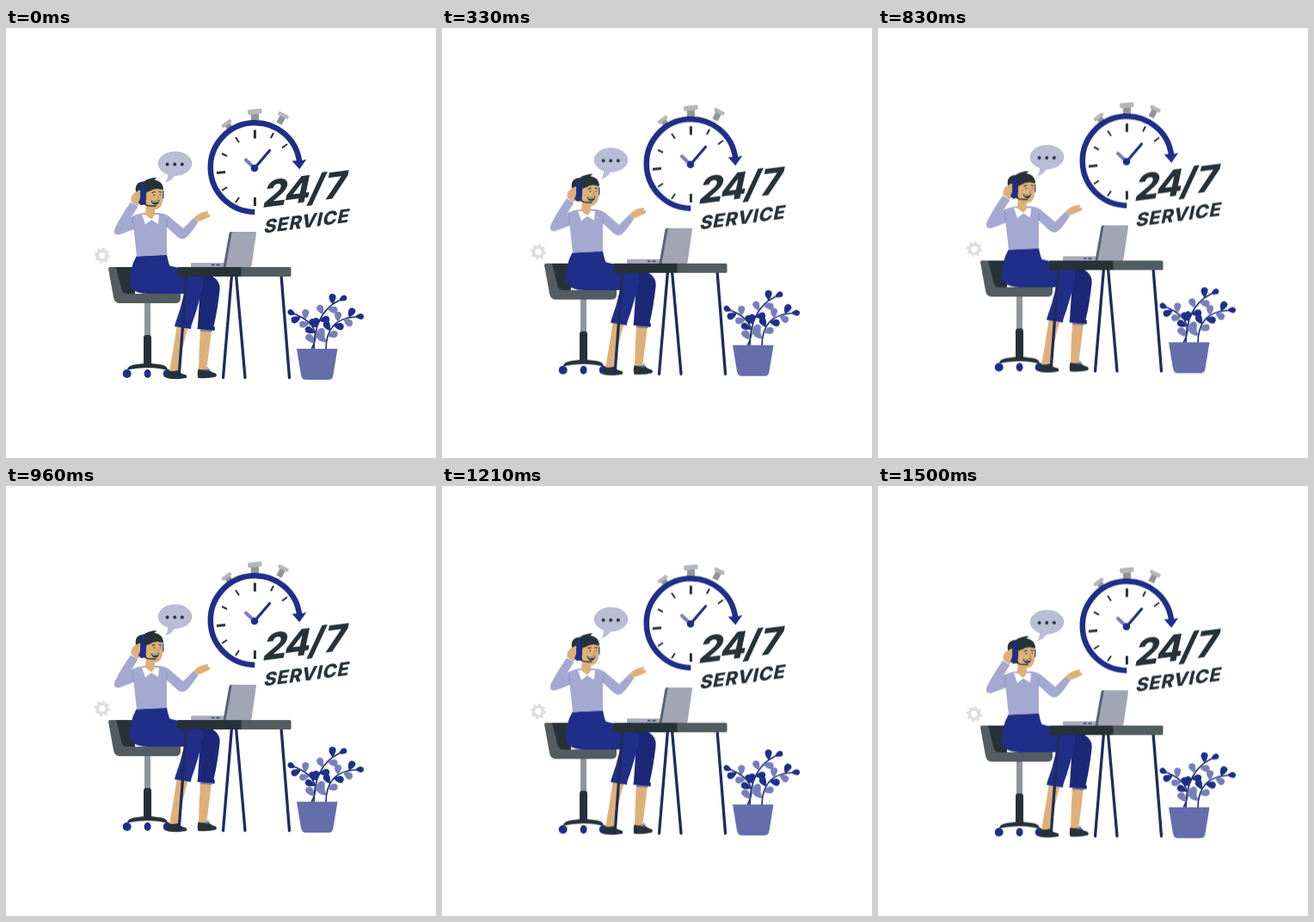
Recreate the animation shown at these times as an HTML page. Size 500 by 500 pixels, loop 1.54 s.

```html
<!DOCTYPE html>
<html lang="en">
<head>
<meta charset="utf-8">
<title>24/7 service</title>
<style>
  html, body { margin: 0; width: 100%; height: 100%; overflow: hidden; background: #fff; }
  svg { display: block; width: 100vw; height: 100vh; }
  #scene { animation: bob 1540ms -62ms infinite linear; }
  @keyframes bob {
    0%, 100% { transform: translateY(.8px); }
    50% { transform: translateY(-9.2px); }
  }
  .navy { fill: #1f2e88; }
  .deep { fill: #1b2877; }
  .lav { fill: #a3a9d1; }
  .mid { fill: #7680b8; }
  .skin { fill: #deb079; }
  .dark { fill: #263238; }
  .slate { fill: #525c61; }
  .gray { fill: #8f9699; }
  .pale { fill: #b4b7bb; }
  .white { fill: #fff; }
  .line { fill: none; stroke-linecap: round; stroke-linejoin: round; }
  .flat { fill: none; }
  text { font-family: Inter, "Open Sans", sans-serif; fill: #263238; }
</style>
</head>
<body>
<svg viewBox="0 0 500 500">
  <defs>
    <path id="leaf" d="M0 0C-3-3-5-7-4.500-10Q-3.500-13.500 0-13.500Q4.500-13 4.500-9Q4-5 0 0Z"/>
    <g id="button">
      <rect class="gray" x="-3.500" y="0" width="7" height="11"/>
      <rect class="pale" x="-6.500" y="-2.200" width="13" height="4.400" rx="1.500"/>
    </g>
  </defs>
  <g id="scene">
    <!-- stopwatch -->
    <use href="#button" transform="translate(256.500 111) rotate(-36)"/>
    <use href="#button" transform="translate(322.500 101.500) rotate(27)"/>
    <rect class="gray" x="285" y="98" width="9" height="10"/>
    <rect class="pale" x="-8.300" y="-3" width="16.600" height="6" rx="2" transform="translate(289.300 97.300) rotate(-6)"/>
    <path class="flat" d="M289.300 214A51.900 51.900 0 1 1 341.200 156" stroke="#1f2e88" stroke-width="6.500"/>
    <path class="navy" d="M332.600 154.400L344 154L349.300 152.800L341.200 164.300Z"/>
    <path class="flat" d="M289.400 118.500V128.500M289.400 197V207M245 168.500L255 167.500" stroke="#263238" stroke-width="3"/>
    <path class="flat" d="M251 146L257 149M267 127L271 133M311 122L308 128M327 135L321 139.500M251 189L257 185M267 203L271 197" stroke="#263238" stroke-width="2"/>
    <path class="line" d="M289 163L279 153.500" stroke="#7680b8" stroke-width="4"/>
    <path class="line" d="M289 163L306.500 142.500" stroke="#1f2e88" stroke-width="3.200"/>
    <circle class="navy" cx="289" cy="163" r="4.300"/>

    <!-- lettering -->
    <g transform="matrix(1 -.13 -.21 1 298 209)">
      <text x="-1 24 52 70" font-size="43.500" font-weight="800">24/7</text>
    </g>
    <g transform="matrix(1 -.13 -.21 1 299 238.700)">
      <text font-size="22" font-weight="800" letter-spacing=".6">SERVICE</text>
    </g>

    <!-- speech bubble -->
    <g fill="#b9bdd6" stroke="#abaec0" stroke-width=".8">
      <ellipse cx="196.500" cy="157.700" rx="19.300" ry="13.700"/>
    </g>
    <path fill="#b9bdd6" d="M188 169Q188.500 176 184.800 180Q192 178.500 197 170.500Z"/>
    <path class="line" d="M187.600 158.600h0m8.600 0h0m8.600 0h0" stroke="#263238" stroke-width="4"/>

    <!-- gear -->
    <g fill="none" stroke="#dedede" transform="translate(111.900 264.600)">
      <circle r="5.500" stroke-width="3.600"/>
      <circle r="8" stroke-width="2.200" pathLength="16" stroke-dasharray="1"/>
    </g>

    <!-- chair -->
    <path class="slate" d="M119 280Q119 278 121 278H148V309H203V314Q203 320 197 320H132Q126 320 125 313Z"/>
    <path class="dark" d="M128 278H150V309H141Q135.500 309 134.500 304Z"/>
    <path class="gray" d="M161 320H168V360H161Z"/>
    <path class="dark" d="M160 392V360Q160 357 163 357H166Q169 357 169 360V390L181 391.500Q188 393 188 398Q177 395 164.500 395Q152 395 141 397.500Q141 393 149 391.500L160 390Z"/>
    <g class="navy">
      <circle cx="140.700" cy="402" r="5"/><ellipse cx="164.600" cy="402" rx="4" ry="5"/><circle cx="187.700" cy="402" r="5"/>
    </g>

    <!-- legs -->
    <path class="skin" d="M226 349H239Q236.500 374 233 398H224Q224.500 373 226 349Z"/>
    <path class="skin" d="M199 345L212 347Q204 374 200 400H190Q194.500 374 199 345Z"/>
    <path class="dark" d="M223.500 396.500Q229.500 398.500 235 396.500Q238.500 400.500 243.500 401.500Q246 403.500 244 405.500Q236 408 223.500 407Q222 403 223.500 396.500Z"/>
    <path class="dark" d="M188 398Q193 400 199.500 398Q204 402.500 208.500 403Q211.500 404.500 209.500 407Q200 409 188.500 407.500Q186.500 404 188 398Z"/>
    <path class="line" d="M232 398L234.500 394.500L236.500 397.500Z" stroke="#7680b8"/>
    <path class="deep" d="M205 286H233Q250 291 248.500 305Q246 328 241.500 347L243 348L242.500 352L222.500 350L223 346L226 300Z"/>
    <path class="flat" d="M226 351.500L239.500 352.500" stroke="#6872ac" stroke-width="1.500"/>
    <path class="navy" d="M151.500 265.500L187 263.500Q188.500 272 190.500 276.500L203 279.500H214Q231 283 229 299Q223 326 215.500 346L215 350L196 347L197 343Q203 327 207 309H165Q146 309 144 297Q143.500 280 151.500 265.500Z"/>

    <!-- torso and arms -->
    <path class="lav" d="M145 202.500L153.500 207.500L145.500 220Q151 216 161 215H178Q188 216 193 222L206 233L218 221L223.500 225.500Q215 239 209 244Q204.500 247 199.500 243L187 231.500V264L152 265.500L148.500 234Q138 238 131 240.500Q124 241 126.500 233Q134 218 145 202.500Z"/>
    <path class="line" d="M148.500 233L147.500 219M187 231.500V222" stroke="#7d84b4" stroke-width=".6"/>
    <path class="skin" d="M218 221Q222 216.500 227.500 214.500L234 213Q236.500 213.500 234 216L237.500 217Q238.500 219.500 233.500 221Q228 224 223 225Z"/>
    <path class="white" d="M158 217L162 228.500L169 223L177 228L178 217Z"/>
    <path class="skin" d="M163 203H173V215Q173.500 218 169.500 222Q164 220 162 216Z"/>

    <!-- head -->
    <path class="dark" d="M151 191Q149 179 160 178.500Q166 174 175.500 174L172.500 176.500Q182 178 183 187L181 190L164 189L163 205L157 206Q151.500 201 151 191Z"/>
    <path class="skin" d="M164 188Q174 188.500 180.500 185Q183 189 182.500 198Q181.500 211 173 211Q164 210 162 201Z"/>
    <path class="dark" d="M161 180Q167 176.500 177 180Q183 183 182.500 188Q177 187.500 174 185.500Q170 189 163.500 191Z"/>
    <path class="line" d="M170 191.500L173 190.500M178 190.500L180.500 191M172 194.200h.6M179 194h.6" stroke="#263238" stroke-width="1.200"/>
    <path class="line" d="M176 195L177.500 198.500L176 199" stroke="#b77f4e" stroke-width=".7"/>
    <path class="dark" d="M168.500 200.500Q173.500 202 178.500 200Q177.500 205.500 173.500 205.500Q169.500 205 168.500 200.500Z"/>
    <path class="line" d="M170.500 202Q174 203 177 201.500" stroke="#fff"/>
    <path class="skin" d="M145.500 201.500Q144.500 195 149.500 191.500L155 188.500Q158 189 157.500 193V200Q155 206.500 152 206.500Z"/>
    <path class="navy" d="M156.500 187Q157 180.500 160.500 179L162 180Q160.500 183 161 187.500Q163.500 192 163 199Q162 205.500 158.500 205.500Q154.500 205 154 202.500Q157 198 156 193Z"/>
    <path class="line" d="M161 204.500Q164 207.500 172 207h2" stroke="#263238" stroke-width="1.400"/>
    <path class="line" d="M182.800 189.500V198" stroke="#1f2e88" stroke-width="1.200"/>

    <!-- desk and laptop -->
    <path class="line" d="M210 287L201 406.500M262.500 287L252.500 406.500M267.500 287L278 406.500M320 287L329.500 406.500" stroke="#1f2c5c" stroke-width="3.300"/>
    <rect class="slate" x="199" y="278" width="132.500" height="11" rx="1.500"/>
    <path class="dark" d="M200.500 278H273.500V289H200.500Q199 289 199 287.500V279.500Q199 278 200.500 278Z"/>
    <path fill="#a8acbb" d="M216 273H254V278H215V274Q215 273 216 273Z"/>
    <path class="flat" d="M239 275.500H242.500M244.500 275.500H248.500" stroke="#263a70" stroke-width="1.400"/>
    <path fill="#596078" d="M261.500 237H267L258 278H252.500L259.500 238.500Q260 237 261.500 237Z"/>
    <path fill="#a1a5b4" d="M264 237H290Q291.500 237 291 238.500L285.500 276.500Q285 278 283.500 278H255.500L262.500 238.500Q262.500 237 264 237Z"/>

    <!-- plant -->
    <g id="plant">
      <g class="line" stroke="#1f2c70" stroke-width="1.700">
        <path class="stem" d="M358 375Q358 331 387 317"/>
        <path class="stem" d="M355 374Q370 347 337 333"/>
        <path class="stem" d="M372 374Q372 338 406 336"/>
      </g>
    </g>
    <path d="M338 373H385.500L380.500 403.500Q380 409 374.500 409H349Q344 409 343 403.500Z" fill="#646eaa"/>
  </g>
</svg>
<script>
  const plant = document.getElementById('plant');

  function addLeaf(x, y, angle, size, tone) {
    const leaf = document.createElementNS('http://www.w3.org/2000/svg', 'use');
    leaf.setAttribute('href', '#leaf');
    leaf.setAttribute('class', tone);
    leaf.setAttribute('transform', `translate(${x} ${y}) rotate(${angle}) scale(${size})`);
    plant.appendChild(leaf);
  }

  // Leaves alternate sides along each stem; one closes the tip.
  const COUNT = 8;
  for (const stem of document.querySelectorAll('.stem')) {
    const length = stem.getTotalLength();
    for (let i = 0; i < COUNT; i++) {
      const at = length * (.15 + .85 * i / (COUNT - 1));
      const p = stem.getPointAtLength(at);
      const q = stem.getPointAtLength(at - 1);
      const heading = Math.atan2(p.y - q.y, p.x - q.x) * 180 / Math.PI + 90;
      const tip = i === COUNT - 1;
      const turn = tip ? 0 : i % 2 ? 55 : -55;
      addLeaf(p.x, p.y, heading + turn, tip ? .75 : .9, i % 4 < 2 && !tip ? 'mid' : 'navy');
    }
  }
</script>
</body>
</html>
```
